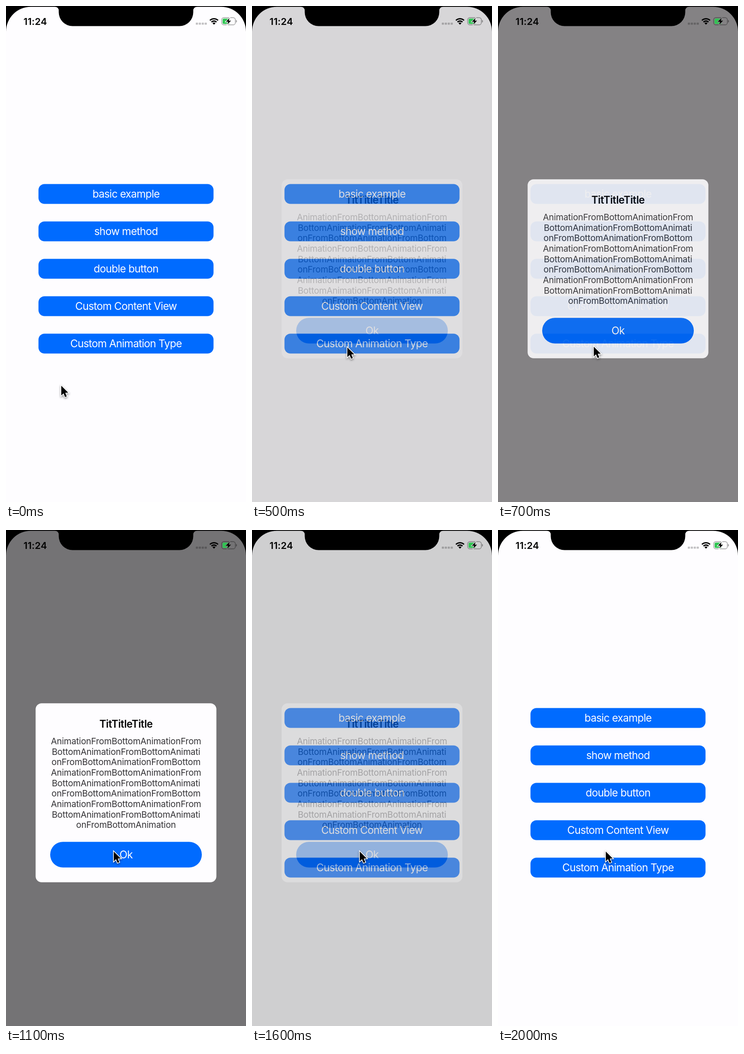
These frames come from a looping animation (521x1074 px, 2100 ms). An HTML page with a canvas:

```html
<!DOCTYPE html>
<html lang="en">
<head>
<meta charset="utf-8">
<title>Alert animation</title>
<style>
  html, body { margin: 0; width: 100%; height: 100%; overflow: hidden; background: #000; }
  canvas { display: block; width: 521px; height: 1074px; }
</style>
</head>
<body>
<canvas id="stage" width="521" height="1074"></canvas>
<script>
const W = 521, H = 1074, LOOP = 2100, STEP = 100;
const CENTER = 260.5, BLUE = '#006bff', PAPER = '#fefdff';
const DIM = 0.545;      // strength of the fully shown backdrop
const SPRING = 0.014;   // critically damped, per ms

const LABELS = ['basic example', 'show method', 'double button', 'Custom Content View', 'Custom Animation Type'];
const MESSAGE = [
  'AnimationFromBottomAnimationFrom',
  'BottomAnimationFromBottomAnimati',
  'onFromBottomAnimationFromBottom'
];
const LINES = [...MESSAGE, ...MESSAGE, ...MESSAGE.slice(0, 2), 'onFromBottomAnimation'];

const STYLES = {
  button: { font: '400 22.8px Inter, sans-serif', spacing: '-0.7px' },
  title: { font: '600 22.3px Inter, sans-serif', spacing: '-0.4px' },
  body: { font: '400 18.9px Inter, sans-serif', spacing: '-0.2px' },
  clock: { font: '600 20.6px Inter, sans-serif', spacing: '0.2px' }
};

const ctx = document.getElementById('stage').getContext('2d');
const dialogLayer = document.createElement('canvas');
dialogLayer.width = W;
dialogLayer.height = H;
const dialogCtx = dialogLayer.getContext('2d');

function box(c, x, y, w, h, r, color) {
  c.fillStyle = color;
  c.beginPath();
  c.roundRect(x, y, w, h, r);
  c.fill();
}

function label(c, text, x, y, style, color) {
  c.font = style.font;
  c.letterSpacing = style.spacing;
  c.textAlign = 'center';
  c.fillStyle = color;
  c.fillText(text, x, y);
}

function polygon(points) {
  ctx.beginPath();
  points.forEach(([x, y]) => ctx.lineTo(x, y));
  ctx.closePath();
}

function drawMenu() {
  ctx.fillStyle = PAPER;
  ctx.fillRect(0, 0, W, H);
  LABELS.forEach((text, i) => {
    const y = 385.5 + i * 81;
    box(ctx, 70.5, y, 380, 43, 13, BLUE);
    label(ctx, text, CENTER, y + 29.8, STYLES.button, PAPER);
  });
}

function drawDialog(alpha) {
  const c = dialogCtx;
  c.clearRect(0, 0, W, H);
  box(c, 64.3, 375.3, 392.4, 387.4, 13, PAPER);
  label(c, 'TitTitleTitle', CENTER, 428, STYLES.title, '#000');
  LINES.forEach((line, i) => label(c, line, CENTER, 464 + i * 22.65, STYLES.body, '#343336'));
  box(c, 95.9, 675.2, 329.2, 55.6, 27.8, BLUE);
  label(c, 'Ok', CENTER, 711.3, STYLES.button, PAPER);
  ctx.globalAlpha = alpha;
  ctx.drawImage(dialogLayer, 0, 0);
  ctx.globalAlpha = 1;
}

// Black frame around the screen: rounded top corners and the notch.
function drawBezel() {
  const top = 1.7, corner = 54, left = 114.5, right = W - left, bottom = 43.6, fillet = 8;
  ctx.fillStyle = '#000';
  ctx.beginPath();
  ctx.rect(0, 0, W, H);
  ctx.roundRect(0, top, W, H, [corner, corner, 0, 0]);
  ctx.fill('evenodd');
  ctx.beginPath();
  ctx.moveTo(left - fillet, 0);
  ctx.lineTo(left - fillet, top);
  ctx.arcTo(left, top, left, bottom, fillet);
  ctx.arcTo(left, bottom, right, bottom, 30);
  ctx.arcTo(right, bottom, right, top, 30);
  ctx.arcTo(right, top, right + fillet, top, fillet);
  ctx.lineTo(right + fillet, 0);
  ctx.fill();
}

function drawWifi() {
  const x = 451.5, y = 40.5, spread = 0.76;
  const from = -Math.PI / 2 - spread, to = -Math.PI / 2 + spread;
  ctx.fillStyle = ctx.strokeStyle = '#000';
  ctx.beginPath();
  ctx.moveTo(x, y);
  ctx.arc(x, y, 4.8, from, to);
  ctx.fill();
  ctx.lineWidth = 2.8;
  for (const r of [8, 12.8]) {
    ctx.beginPath();
    ctx.arc(x, y, r, from, to);
    ctx.stroke();
  }
}

function drawBattery(backdrop) {
  ctx.strokeStyle = 'rgba(0,0,0,.38)';
  ctx.lineWidth = 1.4;
  ctx.beginPath();
  ctx.roundRect(468.2, 25.2, 29.6, 15.6, 4.6);
  ctx.stroke();
  box(ctx, 499.3, 30.3, 1.9, 5.4, [0, 2, 2, 0], 'rgba(0,0,0,.4)');
  box(ctx, 470.2, 27.2, 15, 11.6, [2.6, 0, 0, 2.6], '#30c553');
  polygon([[485.3, 26], [477.3, 34], [482.2, 34], [480.6, 40], [488.5, 31.8], [483.6, 31.8]]);
  ctx.strokeStyle = backdrop;
  ctx.lineWidth = 2.4;
  ctx.stroke();
  ctx.fillStyle = '#000';
  ctx.fill();
}

function drawStatusBar(dim) {
  label(ctx, '11:24', 63.6, 40.5, STYLES.clock, '#000');
  for (let i = 0; i < 4; i++) box(ctx, 412 + i * 6.4, 36, 4.8, 4.4, 1, 'rgba(0,0,0,.23)');
  drawWifi();
  const shade = Math.round(254 * (1 - dim));
  drawBattery(`rgb(${shade},${shade},${shade})`);
}

function drawCursor(x, y) {
  ctx.save();
  ctx.translate(x, y);
  ctx.scale(1.06, 1.06);
  polygon([[0, 0], [0, 19.8], [4.6, 15.6], [7.8, 23], [11.2, 21.6], [8.1, 14.3], [14.2, 14.1]]);
  ctx.lineJoin = 'miter';
  ctx.strokeStyle = '#fff';
  ctx.lineWidth = 2.8;
  ctx.shadowColor = 'rgba(0,0,0,.45)';
  ctx.shadowBlur = 4;
  ctx.shadowOffsetY = 2;
  ctx.stroke();
  ctx.shadowColor = 'transparent';
  ctx.fillStyle = '#000';
  ctx.fill();
  ctx.restore();
}

function spring(elapsed) {
  const x = SPRING * Math.max(0, elapsed);
  return 1 - (1 + x) * Math.exp(-x);
}

function ease(t, start, end) {
  const p = Math.min(1, Math.max(0, (t - start) / (end - start)));
  return p * p * (3 - 2 * p);
}

function draw(t) {
  const shown = t < 1438 ? spring(t - 426) : 1 - spring(t - 1438);
  const dim = DIM * shown;
  drawMenu();
  ctx.fillStyle = `rgba(3,0,3,${dim})`;
  ctx.fillRect(0, 0, W, H);
  if (shown > 0.004) drawDialog(shown ** 1.15);
  drawStatusBar(dim);
  drawBezel();
  const toMenu = ease(t, 0, 400), toOk = ease(t, 650, 1100);
  drawCursor(120 + 87 * toMenu + 27 * toOk, 822.3 - 83 * toMenu - 43 * toOk);
}

// The picture advances ten times a second.
function tick(now) {
  draw(Math.floor((now % LOOP) / STEP) * STEP);
  requestAnimationFrame(tick);
}
draw(0);
requestAnimationFrame(tick);
</script>
</body>
</html>
```
